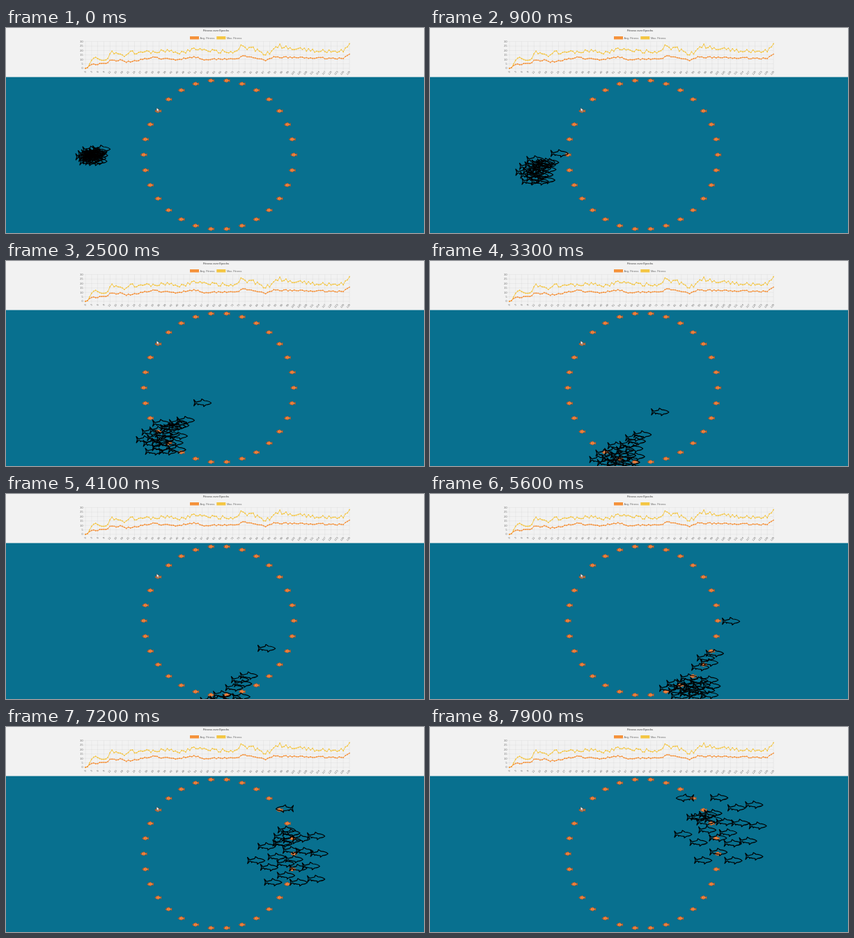
An HTML page for the animation above (8 s loop, 600 by 295 pixels).

```html
<!DOCTYPE html>
<html lang="en">
<head>
<meta charset="utf-8">
<title>Fitness over Epochs</title>
<style>
html, body { margin: 0; width: 100%; height: 100%; overflow: hidden; background: #08708f; }
svg { display: block; width: 100vw; height: 100vh; }
text { font-family: "Liberation Sans", Arial, sans-serif; font-size: 3.8px; fill: #666; }
</style>
</head>
<body>
<svg id="stage" viewBox="0 0 600 295">
  <defs>
    <path id="shark" fill="none" stroke="#000" stroke-width="1.2" stroke-linejoin="round"
      d="M-12.5-4.5L-9.2-.9Q-5-2-2.2-2.6L-1-5.4L2.8-3C7-3 10.2-1.8 12.6.4Q10.5 2.6 5 3L1.8 5.4L1.6 3.1Q-3 3-5.2 2L-6.5 3L-7 1.5L-9.2 1L-12.3 4.5L-11 0Z"/>
    <g id="fish">
      <path d="M-4.5.1Q-3-2.2-1-2.1L.3-2.9L2-1.7L3-.7L4.6-2V2.1L3 .9L1.6 1.9L.4 2.8L-1 2.2Q-3 2.3-4.5.1Z"
        fill="#ee7930" stroke="#8a4f30" stroke-width=".6"/>
      <path d="M-1.8-1.7Q-1.1 0-1.8 1.8M1.5-1.5V1.5" fill="none" stroke="#d9a889" stroke-width=".5"/>
      <circle cx="-3" cy="-.4" r=".5" fill="#3a2522"/>
    </g>
  </defs>
  <rect width="600" height="295" fill="#08708f"/>
  <rect width="600" height="70.6" fill="#f2f2f2"/>
  <g id="chart"></g>
  <g id="ring"></g>
  <g id="school"></g>
  <path d="M216.2 114.6V120.2L217.5 119L218.5 121.2L219.5 120.7L218.6 118.7H220.4Z" fill="#fff" stroke="#222" stroke-width=".5"/>
</svg>
<script>
const LOOP = 8000, STEP = 100;
const byId = id => document.getElementById(id);

function add(parent, tag, attrs, text) {
  const el = document.createElementNS("http://www.w3.org/2000/svg", tag);
  for (const key in attrs) el.setAttribute(key, attrs[key]);
  if (text !== undefined) el.textContent = text;
  parent.append(el);
  return el;
}

function seeded(seed) {
  return () => {
    seed = (seed * 16807) % 2147483647;
    return seed / 2147483647;
  };
}

// Keys are [position, value] pairs in rising order.
function segment(keys, at) {
  let i = 0;
  while (i < keys.length - 2 && at >= keys[i + 1][0]) i++;
  return i;
}

function linear(keys, at) {
  const i = segment(keys, at);
  const [a, from] = keys[i], [b, to] = keys[i + 1];
  return from + (to - from) * (at - a) / (b - a);
}

function smooth(keys, at) {
  const slope = k => {
    const [a, from] = keys[Math.max(k - 1, 0)];
    const [b, to] = keys[Math.min(k + 1, keys.length - 1)];
    return (to - from) / (b - a);
  };
  const i = segment(keys, at);
  const [a, from] = keys[i], [b, to] = keys[i + 1];
  const span = b - a, s = (at - a) / span, r = 1 - s;
  return from * (1 + 2 * s) * r * r + to * s * s * (3 - 2 * s)
    + span * s * r * (slope(i) * r - slope(i + 1) * s);
}

// Chart
const chart = byId("chart");
const EPOCHS = 129;
const ORANGE = "#f5923b", YELLOW = "#f4c643";
const chartX = epoch => 114 + epoch * 379 / EPOCHS;
const chartY = value => 58 - value * 38.5 / 30;

function drawAxes() {
  const line = (x1, y1, x2, y2) =>
    add(chart, "line", { x1, y1, x2, y2, stroke: "#000", "stroke-opacity": .1, "stroke-width": .4 });
  for (let v = 0; v <= 30; v += 5) {
    line(111, chartY(v), 493, chartY(v));
    add(chart, "text", { x: 110.5, y: chartY(v) + 1.4, "text-anchor": "end" }, v);
  }
  for (let e = 0; e <= EPOCHS; e += 3) {
    const x = chartX(e);
    line(x, 19.5, x, 61);
    add(chart, "text", {
      x: 0, y: 1.3, "text-anchor": "end",
      transform: `translate(${x + .4} 62.2) rotate(-50)`
    }, e);
  }
}

function drawSeries(color, trend, jitter, seed) {
  const random = seeded(seed);
  const points = [];
  for (let e = 0; e <= EPOCHS; e++) {
    const noise = e ? (random() - .5) * jitter : 0;
    points.push([chartX(e), chartY(linear(trend, e) + noise)]);
  }
  add(chart, "polyline", { points: points.join(" "), fill: "none", stroke: color, "stroke-width": .9 });
  for (const [cx, cy] of points) add(chart, "circle", { cx, cy, r: .95, fill: color });
}

function drawLegend(x, color, label) {
  add(chart, "rect", { x, y: 12, width: 13, height: 4.4, fill: color });
  add(chart, "text", { x: x + 14.6, y: 15.5 }, label);
}

add(chart, "text", { x: 301.5, y: 5, "text-anchor": "middle", "font-weight": "bold" }, "Fitness over Epochs");
drawLegend(264, ORANGE, "Avg. Fitness");
drawLegend(302.3, YELLOW, "Max. Fitness");
drawAxes();
drawSeries(YELLOW, [
  [0, 0], [4, 11], [10, 10], [13, 17], [20, 14], [22, 18], [42, 19], [48, 17], [53, 21],
  [74, 18], [76, 24], [82, 22], [88, 15], [95, 25], [108, 20], [126, 19], [128, 26], [129, 26]
], 4.5, 71);
drawSeries(ORANGE, [
  [0, 0], [3, 4.5], [10, 5], [12, 8.5], [18, 9.5], [20, 7], [33, 12], [44, 9.5], [53, 13],
  [58, 10], [74, 11], [77, 13.5], [84, 11.5], [88, 8], [92, 12.5], [126, 11], [129, 16]
], 1.6, 19);

// Ring of prey
for (let i = 0; i < 30; i++) {
  const a = i * Math.PI / 15;
  add(byId("ring"), "use", { href: "#fish", x: 305.4 + 107.7 * Math.cos(a), y: 182.4 + 107.3 * Math.sin(a) });
}

// School of sharks: one leader, a few close followers and a loose crowd
const FOLLOWERS = 4, CROWD = 19;
const poses = [
  { time: 0,    lead: [137, 174], crowd: [124, 185], spread: [12, 11] },
  { time: 1600, lead: [225, 187], crowd: [179, 225], spread: [24, 26] },
  { time: 2500, lead: [282, 204], crowd: [226, 256], spread: [28, 26] },
  { time: 4100, lead: [374, 222], crowd: [314, 304], spread: [34, 18] },
  { time: 5600, lead: [432, 183], crowd: [376, 279], spread: [36, 17] },
  { time: 6400, lead: [433, 139], crowd: [393, 234], spread: [42, 36] },
  { time: 7900, lead: [366, 102], crowd: [422, 152], spread: [62, 58] }
];

// keen: 0 stays with the crowd, 1 swims with the leader; (u, v) is the place within the spread
function makeShark(keen, u, v) {
  const route = axis => poses.map(({ time, lead, crowd, spread }) => [
    time,
    crowd[axis] + (lead[axis] - crowd[axis]) * keen + spread[axis] * [u, v][axis]
  ]);
  return { xs: route(0), ys: route(1), el: add(byId("school"), "use", { href: "#shark" }) };
}

const sharks = [makeShark(1, 0, 0)];
for (let i = 0; i < FOLLOWERS; i++) {
  sharks.push(makeShark(.52 - .07 * i, i % 2 ? -.15 : .1, 0));
}
for (let i = 0; i < CROWD; i++) {
  const radius = ((i + .5) / CROWD) ** .65, angle = 2.4 * i;
  sharks.push(makeShark(0, radius * Math.cos(angle), radius * Math.sin(angle)));
}

function render(time) {
  const t = Math.floor(time % LOOP / STEP) * STEP;
  for (const { xs, ys, el } of sharks) {
    const x = smooth(xs, t), y = smooth(ys, t);
    const facing = x - smooth(xs, t - STEP) < -3 ? -1 : 1;
    el.setAttribute("transform", `translate(${x.toFixed(2)} ${y.toFixed(2)}) scale(${facing} 1)`);
  }
}

const start = performance.now();
function tick(now) {
  render(Math.max(0, now - start));
  requestAnimationFrame(tick);
}
render(0);
requestAnimationFrame(tick);
</script>
</body>
</html>
```
